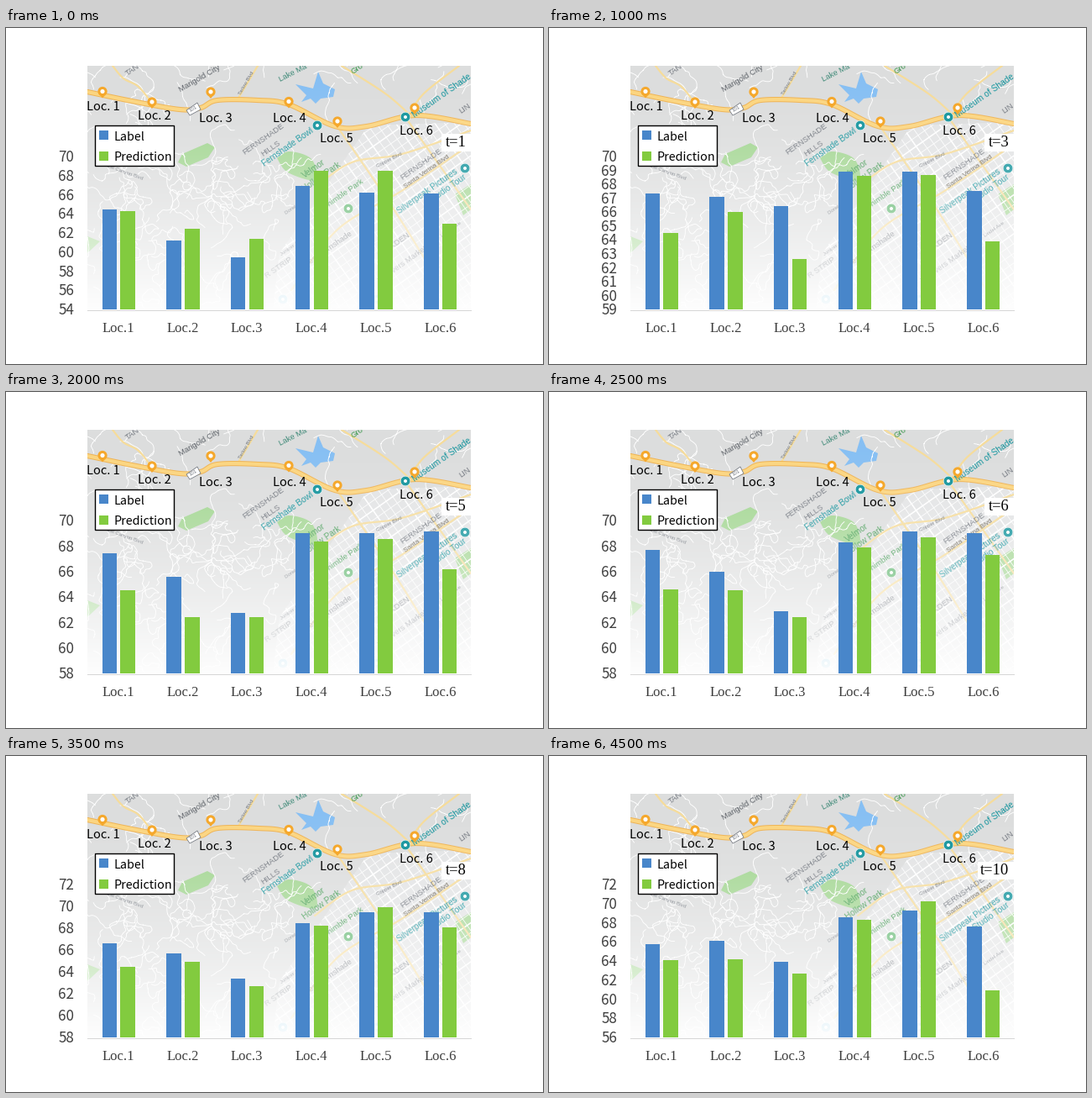
These frames come from a looping animation (640 px wide and 400 px high, 5000 ms). A matplotlib script:

```python
import numpy as np
import matplotlib.pyplot as plt
from matplotlib.animation import FuncAnimation
from matplotlib.patches import Circle, Polygon, Rectangle

W, H, DPI = 640, 400, 100
LEFT, RIGHT, TOP, BASE, AXIS_TOP = 97, 554, 45, 335, 153
PX = 72 / DPI
SANS, SERIF, MAP = "Noto Sans CJK JP", "Liberation Serif", "Liberation Sans"
BLUE, GREEN = "#4886ca", "#82cb3f"
GRAY, TEAL, PARK, LAWN = "#737880", "#12939c", "#3f9a50", "#a3d692"

# time step -> labels, then predictions
READINGS = {
    1: [64.45, 61.2, 59.45, 66.9, 66.2, 66.1, 64.3, 62.45, 61.4, 68.5, 68.5, 63],
    3: [67.35, 67.1, 66.45, 68.9, 68.9, 67.55, 64.5, 66, 62.6, 68.6, 68.7, 63.9],
    4: [67.15, 65.1, 62.6, 69.7, 68.9, 69.25, 64.4, 60.35, 62.4, 68.8, 68.45, 65],
    6: [67.7, 66, 62.85, 68.3, 69.15, 69, 64.6, 64.5, 62.4, 67.9, 68.7, 67.3],
    7: [67.1, 64.55, 62.4, 68.7, 69.55, 69.3, 64.7, 64.5, 62.6, 68.3, 70.4, 68.3],
    9: [66.1, 66.9, 64.4, 68.15, 69.4, 69.6, 64.2, 65.4, 62.85, 68.15, 69.5, 67.8],
    10: [65.75, 66.1, 63.9, 68.55, 69.25, 67.6, 64.1, 64.2, 62.7, 68.3, 70.2, 60.95],
}
LOWS = [54, 58, 59, 54, 58, 58, 58, 58, 58, 56]

fig = plt.figure(figsize=(W / DPI, H / DPI), dpi=DPI, facecolor="white")
ax = fig.add_axes([0, 0, 1, 1])
ax.axis("off")

ground = ax.add_patch(Rectangle((LEFT, TOP), RIGHT - LEFT, BASE - TOP,
                                fc="#dcdddd", ec="none", zorder=0))
hood = ax.add_patch(Polygon([(318, 335), (326, 268), (432, 116), (554, 112),
                             (554, 335)], fc="#e3e4e5", ec="none", zorder=0.5))


def write(x, y, text, size, font=SANS, color="black", ha="center"):
    return ax.text(x, y, text, fontsize=size * PX, family=font, color=color,
                   ha=ha, va="baseline", zorder=10)


def map_label(x, y, text, color=GRAY, size=9.5, angle=35):
    label = ax.text(x, y, text, fontsize=size * PX, family=MAP, color=color,
                    rotation=angle, rotation_mode="anchor", ha="center",
                    va="center", zorder=4, clip_on=True)
    label.set_clip_path(ground)


def street_name(x, y, text, angle=35):
    map_label(x, y, text, size=6.2, angle=angle)


def smooth(points, n=12):
    """Catmull-Rom curve through a few points."""
    p = np.array([points[0], *points, points[-1]], float)
    t = np.linspace(0, 1, n)[:, None]
    parts = [0.5 * (2 * b + (c - a) * t + (2 * a - 5 * b + 4 * c - d) * t**2
                    + (3 * b - a - 3 * c + d) * t**3)
             for a, b, c, d in zip(p, p[1:], p[2:], p[3:])]
    return np.vstack(parts)


def road(points, color="white", width=1.0, z=1, clip=ground):
    line, = ax.plot(*np.asarray(points).T, color=color, lw=width * PX,
                    zorder=z, solid_capstyle="round")
    line.set_clip_path(clip)


def area(points, color=LAWN):
    patch = ax.add_patch(Polygon(points, fc=color, ec="none", zorder=0.8))
    patch.set_clip_path(ground)


def disc(x, y, r, color, z, **style):
    ax.add_patch(Circle((x, y), r, fc=color, zorder=z, **style))


def wander(rng, count, xs, ys, bend, steps):
    for _ in range(count):
        x, y = rng.uniform(*xs), rng.uniform(*ys)
        turn = np.cumsum(rng.normal(0, bend, steps)) + rng.uniform(0, 2 * np.pi)
        path = np.column_stack([x + 4.5 * np.cumsum(np.cos(turn)),
                                y + 4.5 * np.cumsum(np.sin(turn))])
        if y < 90 or path[:, 0].max() < 375:
            road(smooth(path, 5), width=0.9)


def street_grid():
    a = np.radians(35)
    u, v = np.array([np.cos(a), -np.sin(a)]), np.array([np.sin(a), np.cos(a)])
    mid = np.array([450, 225])
    for i, d in enumerate(np.arange(-190, 191, 9.5)):
        w = 0.8 if i % 4 else 1.6
        for along, across in [(u, v), (v, u)]:
            center = mid + d * across
            road([center - 220 * along, center + 220 * along], width=w, clip=hood)


def draw_map():
    area([(205, 160), (210, 150), (240, 137), (249, 142), (241, 154), (215, 165)])
    area(smooth([(323, 155), (338, 147), (364, 156), (369, 181), (336, 172),
                 (323, 155)]))
    area([(535, 198), (554, 186), (554, 216), (545, 223)])
    area([(97, 248), (112, 254), (97, 268)])
    area([(372, 52), (378, 66), (392, 73), (390, 82), (375, 84), (369, 90),
          (363, 84), (352, 88), (358, 80), (345, 67), (366, 72)], "#86bff3")

    rng = np.random.default_rng(8)
    wander(rng, 58, (97, 345), (100, 335), 0.75, 22)
    wander(rng, 22, (97, 554), (45, 82), 0.35, 12)
    street_grid()

    for points in [[(127, 45), (140, 60), (158, 70), (175, 91)],
                   [(276, 85), (285, 70), (300, 45)],
                   [(400, 45), (452, 78), (482, 104)],
                   [(480, 104), (498, 78), (540, 45)],
                   [(340, 312), (395, 240), (473, 193), (554, 138)],
                   [(368, 190), (412, 160), (472, 150), (554, 122)],
                   [(396, 119), (470, 228), (535, 335)],
                   [(478, 109), (554, 216)]]:
        road(smooth(points), "#f6dc9a", 2.2)

    freeway = smooth([(97, 76), (150, 87), (207, 97), (232, 95), (252, 86),
                      (300, 86), (337, 91), (392, 117), (430, 117),
                      (488, 104), (554, 114)])
    road(freeway, "#efb353", 6.2, 2)
    road(freeway, "#fbd57f", 4.2, 2.1)

    map_label(151, 50, "TAN")
    map_label(231, 60, "Marigold City", "#5d6268", angle=30)
    map_label(342, 54, "Lake Ma", "#3f8a78", angle=27)
    map_label(419, 48, "Gro", PARK)
    map_label(547, 96, "LIN")
    map_label(307, 132, "FERNSHADE")
    map_label(316, 143, "HILLS")
    map_label(336, 142, "Fernshade Bowl", TEAL, 10)
    map_label(367, 168, "Velmor", PARK, 10)
    map_label(376, 177, "Hollow Park", PARK, 10)
    map_label(519, 81, "Museum of Shade", TEAL, 10.3)
    map_label(495, 162, "FERNSHADE")
    map_label(502, 171, "Santa Verina Blvd", "#675f50", 8.2)
    map_label(502, 194, "Silverpeak Pictures", TEAL, 10)
    map_label(527, 191, "Studio Tour", TEAL, 10)
    map_label(402, 198, "Thimble Park", PARK)
    map_label(383, 264, "West Fernshade")
    map_label(325, 285, "R STRIP")
    map_label(462, 258, "LARKDEN")
    map_label(473, 281, "Weavers Market")
    street_name(287, 66, "Tarlow Blvd", 60)
    street_name(457, 157, "Copper Blvd", 27)
    street_name(138, 171, "Hazel Canyon Blvd", -20)
    street_name(346, 212, "Dorwin Ave")
    street_name(341, 261, "Juniper Ave")
    street_name(531, 240, "Lindel Ave")

    ax.add_patch(Polygon([(215, 98), (228, 89), (232, 97), (219, 104)],
                         fc="white", ec=GRAY, lw=0.6, zorder=3))
    street_name(223.5, 96.5, "101", 30)
    for x, y, color in [(371, 116, TEAL), (476, 106, TEAL), (547, 167, TEAL),
                        (408, 215, "#5db56c"), (330, 323, "#7fc4e0"),
                        (442, 323, "#7fc4e0")]:
        disc(x, y, 5.8, color, 4.2, ec="white", lw=0.4)
        disc(x, y, 2, "white", 4.3, ec="none")

    fade = np.ones((BASE - TOP, 1, 4))
    fade[:, 0, 3] = 0.96 * np.linspace(0, 1, BASE - TOP) ** 1.7
    ax.imshow(fade, extent=(LEFT, RIGHT, BASE, TOP), aspect="auto", zorder=5)


def draw_pins():
    spots = [(115, 75.5, 116, 98), (174, 88, 177, 109), (244, 76, 249.5, 111.5),
             (337, 87.5, 338, 112), (395, 111, 394, 136.5), (487, 95, 488.5, 127)]
    for i, (x, y, tx, ty) in enumerate(spots, 1):
        ax.add_patch(Polygon([(x - 4.5, y + 2.5), (x + 4.5, y + 2.5), (x, y + 8)],
                             fc="#f5a82c", ec="none", zorder=6))
        disc(x, y, 4.1, "white", 6.1, ec="#f5a82c", lw=3 * PX)
        write(tx, ty, f"Loc. {i}", 14.6)


def draw_legend():
    ax.add_patch(Rectangle((106, 115.5), 94, 48.5, fc="white", ec="black",
                           lw=1.4 * PX, zorder=9))
    for y, color, text in [(122, BLUE, "Label"), (147, GREEN, "Prediction")]:
        ax.add_patch(Rectangle((111, y), 11, 11, fc=color, ec="none", zorder=10))
        write(129, y + 11.5, text, 14.3, ha="left")


draw_map()
draw_pins()
draw_legend()

ax.plot([LEFT, RIGHT], [BASE + 0.5] * 2, color="#d6d6d6", lw=PX, zorder=7)
starts = 114.6 + 76.7 * np.arange(6)
bars = []
for offset, color in [(0, BLUE), (21.8, GREEN)]:
    bars += [ax.add_patch(Rectangle((x + offset, BASE), 17.4, 0, fc=color,
                                    ec="none", zorder=8)) for x in starts]
for i, x in enumerate(starts, 1):
    write(x + 19.2, 361.5, f"Loc.{i}", 16.6, SERIF, "#3c3c3c")

ticks = [write(81, 0, "", 17, color="#404040", ha="right") for _ in range(12)]
plate = ax.add_patch(Rectangle((519, 126), 35, 20.5, fc="white", ec="none", zorder=9))
clock = write(548.5, 141, "", 18.5, SERIF, ha="right")
ax.set_xlim(0, W)
ax.set_ylim(H, 0)


def readings(t):
    if t in READINGS:
        return np.array(READINGS[t])
    return (np.array(READINGS[t - 1]) + READINGS[t + 1]) / 2


def update(k):
    t, low, data = k + 1, LOWS[k], readings(k + 1)
    high = 70 if data.max() < 69.2 else 72
    step = 1 if high - low < 12 else 2
    scale = (BASE - AXIS_TOP) / (high - low)
    for bar, value in zip(bars, data):
        height = (value - low) * scale
        bar.set_y(BASE - height)
        bar.set_height(height)
    for i, tick in enumerate(ticks):
        value = low + i * step
        tick.set_text(str(value) if value <= high else "")
        tick.set_y(BASE - (min(value, high) - low) * scale + 6.2)
    clock.set_text(f"t={t}")
    left = 519 if t < 10 else 511
    plate.set_x(left)
    plate.set_width(RIGHT - left)
    return bars + ticks + [clock, plate]


anim = FuncAnimation(fig, update, frames=len(LOWS), interval=500,
                     repeat=True, repeat_delay=0, blit=False)
plt.show()
```
